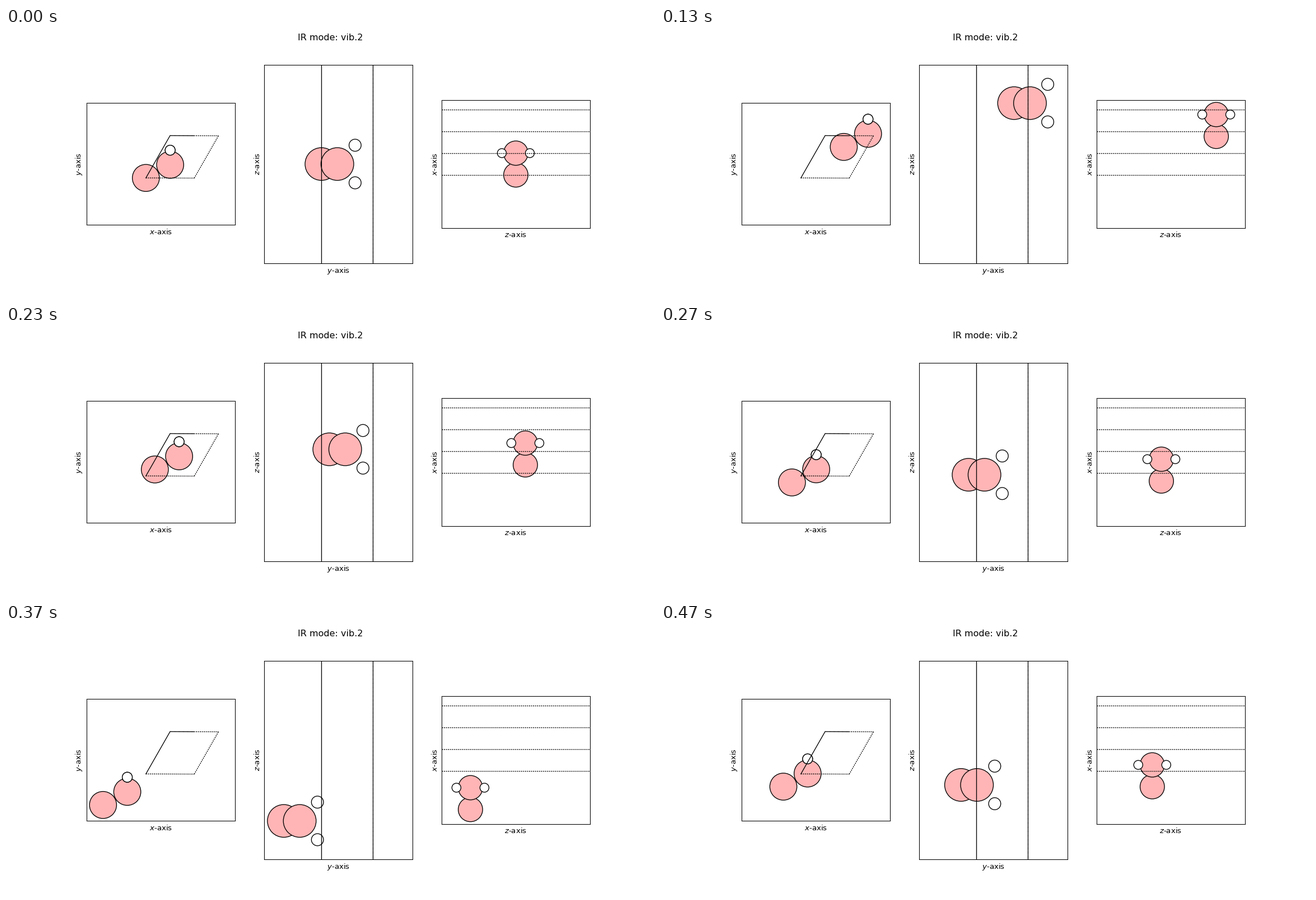
A matplotlib script that plays this animation: 1159 by 483 pixels, repeating every 0.51 s.

```python
import math

import matplotlib.pyplot as plt
from matplotlib.animation import FuncAnimation
from matplotlib.patches import Circle

W, H, DPI = 1159, 483, 96
TICKS, POSES = 51, 15  # 10 ms ticks, vibration poses per loop

plt.rcParams["font.family"] = "DejaVu Sans"
plt.rcParams["font.size"] = 10

# Lengths in angstrom
BORON, HYDROGEN = (0.84, "#ffb5b5"), (0.31, "#ffffff")
ATOMS = [
    ((0, 0, 0), BORON),
    ((1.506, 0.816, 0), BORON),
    ((1.506, 1.725, 0.965), HYDROGEN),
    ((1.506, 1.725, -0.965), HYDROGEN),
]
SHIFT = (2.676, 1.94, 3.145)
A, B = (3.003, -0.01), (1.5015, 2.633)
AB = (A[0] + B[0], A[1] + B[1])

X_MIN, Y_LIM, Z_LIM = -3.666, (-2.927, 4.658), (-5.095, 5.095)
PANELS = [  # horizontal axis, vertical axis, limits
    (0, 1, (X_MIN, 5.517), Y_LIM),
    (1, 2, Y_LIM, Z_LIM),
    (2, 0, Z_LIM, (X_MIN, 5.173)),
]

DOTS = (0, (1.5, 1.15))
LATE_DOTS = (1.3, (1.5, 1.15))

fig, axes = plt.subplots(1, 3, figsize=(W / DPI, H / DPI), dpi=DPI)
fig.subplots_adjust(left=0.12455, right=0.89955, bottom=0.1112, top=0.8812)
fig.suptitle("IR mode: vib.2")


def line(ax, p, q, style=DOTS):
    ax.plot([p[0], q[0]], [p[1], q[1]], color="black", lw=1, ls=style,
            scalex=False, scaley=False)


def draw_cell(top, side, end):
    o = (0, 0)
    for p, q in ((o, A), (A, AB), (B, AB)):
        line(top, p, q)
    line(top, o, B, "-")
    line(top, B, (B[0] + A[0] / 2, B[1] + A[1] / 2), LATE_DOTS)

    for y, style in ((0, "-"), (B[1], DOTS), (B[1], LATE_DOTS)):
        line(side, (y, Z_LIM[0]), (y, Z_LIM[1]), style)

    for x in (0, B[0], A[0], AB[0]):
        line(end, (Z_LIM[0], x), (Z_LIM[1], x))


atoms = []
for ax, (h, v, xlim, ylim) in zip(axes, PANELS):
    ax.set(xlim=xlim, ylim=ylim, xticks=[], yticks=[], aspect="equal",
           xlabel=f"${'xyz'[h]}$-axis", ylabel=f"${'xyz'[v]}$-axis")
    for pos, (radius, color) in ATOMS:
        disc = Circle((pos[h], pos[v]), radius, fc=color, ec="black", lw=1)
        ax.add_patch(disc)
        atoms.append((disc, pos, h, v))
draw_cell(*axes)


def update(tick):
    pose = min((3 * tick + 1) // 10, POSES - 1)
    s = math.sin(2 * math.pi * pose / POSES)
    for disc, pos, h, v in atoms:
        disc.center = (pos[h] + s * SHIFT[h], pos[v] + s * SHIFT[v])
    return [disc for disc, *_ in atoms]


anim = FuncAnimation(fig, update, frames=TICKS, interval=10, repeat=True)
plt.show()
```
